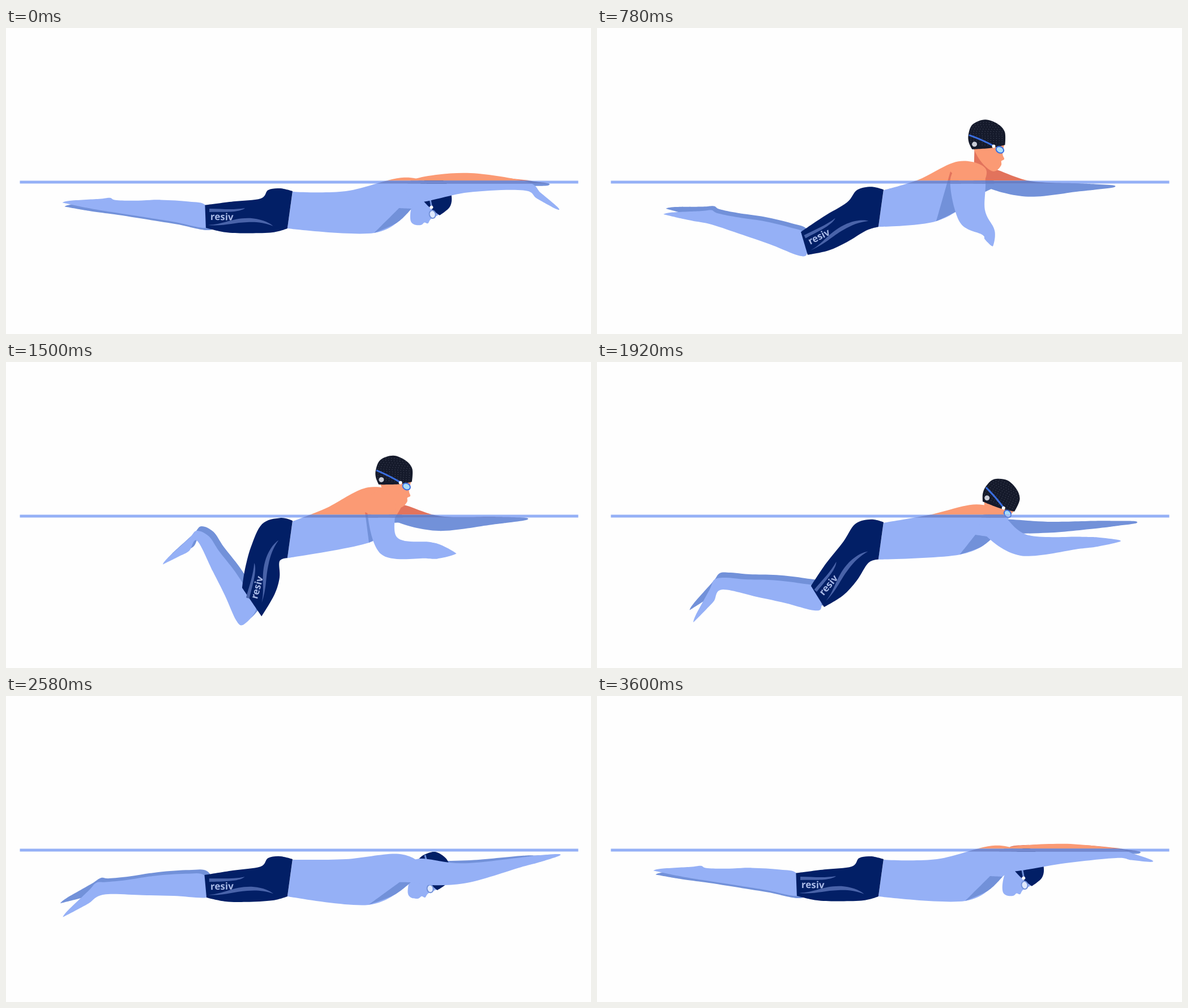
An HTML page for the animation above (3720 ms loop, 1033 by 542 pixels).

```html
<!DOCTYPE html>
<html lang="en">
<head>
<meta charset="utf-8">
<title>Swimmer</title>
<style>
html, body { margin: 0; width: 100%; height: 100%; overflow: hidden; background: #fefefe; }
svg { display: block; width: 100vw; height: 100vh; }
use { --suit: #021f66; }
.air { --skin: #fb9a74; --shade: #e2735c; --cap: #151a2b; --dot: #454a5c; --strap: #3a6ee0; --lens: #a9dcf8; --rim: #fff; --logo: #c9ccd6; }
.line { --skin: #7389d0; --shade: #687ec4; --cap: #2c4288; --dot: none; --strap: #5c7fd8; --lens: #a9c4f5; --rim: #c4d3fa; --logo: #a9bbec; }
.water { --skin: #95b0f6; --shade: #7291d9; --cap: #021f66; --dot: none; --strap: #7291d9; --lens: #dfe9fd; --rim: #fff; --logo: #b9c8f0; }
.skin { fill: var(--skin); }
.shade { fill: var(--shade); }
.cap { fill: var(--cap); }
.suit { fill: var(--suit); }
.dots { fill: none; stroke: var(--dot); stroke-width: 1.1; stroke-dasharray: 1.2 3.8; }
.strap { fill: none; stroke: var(--strap); stroke-width: 3; }
.lens { fill: var(--lens); stroke: var(--strap); stroke-width: 2; }
.rim { fill: var(--rim); }
.logo { fill: var(--logo); }
.trim { fill: #4963a9; }
text { font: bold 17px "Open Sans", sans-serif; fill: #a9b9e6; }
</style>
</head>
<body>
<svg viewBox="0 0 1033 542" preserveAspectRatio="none">
  <defs>
    <clipPath id="above"><rect width="1033" height="270.5"/></clipPath>
    <clipPath id="at"><rect x="24.5" y="270.5" width="986" height="5"/></clipPath>
    <clipPath id="below"><rect y="275" width="1033" height="267"/></clipPath>
    <g id="swimmer">
      <path id="farArm" class="shade"/>
      <path id="farLeg" class="shade"/>
      <path id="neck" class="shade"/>
      <g id="head">
        <path id="face" class="skin"/>
        <path id="cap" class="cap"/>
        <path id="dots" class="dots"/>
        <circle class="logo" cx="-22" cy="17" r="4.5"/>
        <path class="strap" d="M-32 1Q-8 9 13 20"/>
        <ellipse class="lens" cx="23" cy="26" rx="7" ry="5.5" transform="rotate(25 23 26)"/>
        <circle class="rim" cx="12" cy="20" r="3"/>
      </g>
      <path id="torso" class="skin"/>
      <path id="belly" class="shade"/>
      <path id="leg" class="skin"/>
      <path id="shorts" class="suit"/>
      <g id="print">
        <path class="trim" d="M-2-20C20-20 40-18 61-22C50-13 20-15-2-14Z"/>
        <path class="trim" d="M-4 9C25 8 40-6 75-4C95-2 105 4 111 9C95 3 80 2 65 3C40 4 25 11-4 9Z"/>
        <text>resiv</text>
      </g>
      <path id="arm" class="skin"/>
    </g>
  </defs>
  <use href="#swimmer" class="water" clip-path="url(#below)"/>
  <use href="#swimmer" class="air" clip-path="url(#above)"/>
  <rect x="24.5" y="270.5" width="986" height="5" fill="#94b0f6"/>
  <use href="#swimmer" class="line" clip-path="url(#at)"/>
</svg>
<script>
const LOOP = 3720, STEP = 60, LAST = 3600;
const HIP = [480, 322], FOOT = 86;

// torso: back, shoulder, throat, chest, belly, inner end of the belly shade
// arms: shoulder, elbow, fingertip, shoulder half width, hand half width, wrist curl
// legs: knee, calf angle, calf length, foot angle, far leg shift, far foot angle
// head: centre, angle
const glide = {
  torso: [600,289, 700,265, 745,280, 716,320, 650,363, 694,319],
  arm: [725,288, 815,274, 973,319, 21, 6, -22],
  farArm: [740,275, 850,272, 957,277, 10, 4, 0],
  legs: [350,334, 187,166, 183, 4,4, 181],
  head: [760,296, 53]
};
const poses = [
  [0, glide],
  [480, {
    torso: [580,272, 665,240, 718,252, 690,300, 605,348, 650,279],
    arm: [682,280, 730,350, 767,453, 28, 6, -18],
    farArm: [715,268, 790,275, 923,274, 15, 5, 0],
    legs: [353,350, 190,168, 198, 5,-2, 197],
    head: [704,205, 9]
  }],
  [1080, {
    torso: [560,267, 622,234, 667,250, 648,300, 598,336, 610,240],
    arm: [638,252, 622,315, 673,317, 31, 13, 0],
    farArm: [680,265, 750,292, 907,287, 18, 5, 0],
    legs: [379,420, 209,162, 162, 3,-10, 167],
    head: [685,187, 0]
  }],
  [1500, {
    torso: [565,259, 640,222, 700,238, 680,285, 641,320, 634,266],
    arm: [662,250, 676,325, 792,339, 25, 12, 0],
    farArm: [695,268, 765,286, 918,278, 16, 5, 0],
    legs: [424,448, 241,160, 144, 8,-8, 144],
    head: [686,193, 4]
  }],
  [1680, { head: [692,206, 8] }],
  [1920, { legs: [385,420, 190,168, 125, 8,-9, 138] }],
  [2160, { head: [744,271, 48] }],
  [2280, {
    torso: [600,284, 690,278, 728,300, 710,331, 640,364, 690,328],
    arm: [720,312, 800,321, 980,292, 23, 6, 0],
    farArm: [730,305, 820,298, 968,289, 9, 4, 0],
    legs: [352,338, 176,187, 134, 8,-8, 158],
    head: [756,292, 57]
  }],
  [2940, {
    torso: [600,291, 695,280, 741,302, 716,327, 640,371, 696,330],
    arm: [728,305, 810,303, 968,277, 21, 7, 0],
    farArm: [740,295, 830,293, 966,276, 8, 4, 0],
    legs: [350,337, 185,171, 155, 3,-4, 155],
    head: [759,311, 56]
  }],
  [LAST, { ...glide, arm: [725,290, 825,279, 978,292, 21, 6, -8], head: [762,301, 53] }]
];

// monotone cubic through the poses that hold one part
function sample(part, t) {
  const ks = poses.filter(k => part in k[1]).map(k => [k[0], k[1][part]]);
  let i = 0;
  while (i < ks.length - 2 && t >= ks[i + 1][0]) i++;
  const span = ks[i + 1][0] - ks[i][0], u = (t - ks[i][0]) / span;
  const rate = (a, c) => (ks[a + 1][1][c] - ks[a][1][c]) / (ks[a + 1][0] - ks[a][0]);
  const slope = (a, c) => {
    const p = rate(Math.max(a - 1, 0), c), q = rate(Math.min(a, ks.length - 2), c);
    if (p * q <= 0) return 0;
    return Math.sign(p) * Math.min(Math.abs(p + q) / 2, 3 * Math.abs(p), 3 * Math.abs(q));
  };
  return ks[i][1].map((v, c) => v + (ks[i + 1][1][c] - v) * u * u * (3 - 2 * u)
    + span * u * (1 - u) * (slope(i, c) * (1 - u) - slope(i + 1, c) * u));
}

const $ = id => document.getElementById(id);
const set = (id, d) => $(id).setAttribute("d", d);
const fix = v => v.toFixed(1);
const mix = (p, q, k) => [p[0] + (q[0] - p[0]) * k, p[1] + (q[1] - p[1]) * k];
const pairs = a => a.flatMap((v, i) => i % 2 ? [] : [[v, a[i + 1]]]);
const angle = (p, q) => Math.atan2(q[1] - p[1], q[0] - p[0]) * 180 / Math.PI;

// local frame at p: along the given angle, then to its side
function frameAt([x, y], deg) {
  const c = Math.cos(deg * Math.PI / 180), s = Math.sin(deg * Math.PI / 180);
  return (u, v) => [x + c * u - s * v, y + s * u + c * v];
}

// closed smooth outline; listed indices stay sharp
function outline(pts, sharp = []) {
  const n = pts.length, p = i => pts[(i + n) % n];
  const handle = (i, dir) => {
    const k = sharp.includes(i % n) ? 0 : dir / 6;
    return [0, 1].map(c => fix(p(i)[c] + (p(i + 1)[c] - p(i + n - 1)[c]) * k));
  };
  const curve = (q, i) => "C" + [handle(i, 1), handle(i + 1, -1), p(i + 1).map(fix)].join(" ");
  return "M" + pts[0].map(fix) + pts.map(curve).join("") + "Z";
}

function armPath([sx, sy, ex, ey, tx, ty, wide, hand, curl]) {
  const s = [sx, sy], e = [ex, ey], tip = [tx, ty];
  const wrist = frameAt(mix(e, tip, 0.6), angle(e, tip))(0, curl);
  const joints = [s, e, wrist, mix(wrist, tip, 0.45), tip];
  const half = [wide, wide * 0.82, hand * 1.1 + 1.5, hand, 2];
  const edge = side => joints.map((p, i) => {
    const a = frameAt([0, 0], angle(joints[Math.max(i - 1, 0)], joints[Math.max(i, 1)]))(1, 0);
    const b = frameAt([0, 0], angle(joints[Math.min(i, 3)], joints[Math.min(i + 1, 4)]))(1, 0);
    return frameAt(p, angle([0, 0], [a[0] + b[0], a[1] + b[1]]))(0, side * half[i]);
  });
  return outline([...edge(1), ...edge(-1).reverse(), frameAt(s, angle(s, e))(-wide * 0.85, 0)]);
}

function legPath(knee, calf, len, toe) {
  const shin = frameAt(knee, calf), foot = frameAt(shin(len, 0), toe);
  const on = (bone, size, list) => pairs(list).map(([u, v]) => bone(u * size, v));
  return outline([
    ...on(shin, len, [0,20, .18,23, .48,20, .76,13, .96,10]),
    ...on(foot, FOOT, [.03,13, .25,10, .85,4, 1,0, .65,-5, .4,-8]),
    ...on(shin, len, [.98,-12, .6,-14, .3,-16, 0,-20, -.08,-12])
  ], [8]);
}

// the shorts follow the thigh; the hem tilts and widens as the knee bends
function drawShorts(knee, calf) {
  const thigh = angle(HIP, knee), lift = 174 - thigh, bend = calf - thigh;
  const squash = (bend / 124) ** 2;
  const len = Math.hypot(knee[0] - HIP[0], knee[1] - HIP[1]) - 2 - 22 * squash;
  const bone = frameAt(HIP, thigh), centre = bone(len, 0);
  const hem = frameAt(centre, thigh + bend * 0.25), wide = 20 + 10 * squash;
  const rise = 0.13 * lift;
  set("shorts", outline([
    [506, 289 - rise], [484, 284 - rise], [463 - 0.18 * lift, 287],
    bone(len * 0.22, 23 + 0.3 * lift), bone(len * 0.6, 22 + 0.2 * lift),
    hem(0, wide), hem(0, -wide),
    bone(len * 0.75, -31), bone(len * 0.47, -36 + 0.15 * lift),
    [471 + 0.2 * lift, 362 - 0.15 * lift], [497, 355 - rise]
  ], [0, 5, 6, 10]));
  place("print", [...bone(len - 8, -7), -1.25 * lift]);
  return rise;
}

function drawTorso(rise, head, farShoulder) {
  const [back, shoulder, throat, chest, belly, inner] = pairs(sample("torso", T));
  const top = [506, 290 - rise], bottom = [497, 355 - rise];
  set("torso", outline([top, back, shoulder, throat, chest, belly, bottom], [0, 6]));
  const mid = [0, 1].map(c => (9 * (chest[c] + belly[c]) - throat[c] - bottom[c]) / 16);
  set("belly", outline([inner, chest, mid, belly], [0, 1, 3]));
  const skull = frameAt(head, head[2]);
  set("neck", outline([skull(-22, 24), skull(4, 50), [farShoulder[0] + 10, farShoulder[1] + 16], chest], [0, 1, 2, 3]));
}

const place = (id, [x, y, a]) =>
  $(id).setAttribute("transform", `translate(${fix(x)} ${fix(y)}) rotate(${fix(a)})`);

let T = 0;
function draw(t) {
  T = t;
  const head = sample("head", t), farArm = sample("farArm", t);
  const [x, y, calf, len, toe, dx, dy, farToe] = sample("legs", t);
  set("leg", legPath([x, y], calf, len, toe));
  set("farLeg", legPath([x + dx, y + dy], calf, len, farToe));
  drawTorso(drawShorts([x, y], calf), head, farArm);
  set("arm", armPath(sample("arm", t)));
  set("farArm", armPath(farArm));
  place("head", head);
}

set("cap", outline(pairs([-33,0, -26,-18, -4,-27, 18,-20, 31,-6, 32,17, 8,23, -26,26, -32,14]), [5, 7]));
set("face", outline(pairs([-24,24, 31,15, 28,33, 31,42, 26,46, 26,53, 19,62, 10,64, -2,56, -14,42]), [0, 1]));
let rows = "";
for (let y = -22; y < 20; y += 4) {
  const w = y < 0 ? 30 * Math.sqrt(1 - (y / 27) ** 2) : 29;
  rows += `M${fix(-w)} ${y}H${fix(w)}`;
}
set("dots", rows);

function tick() {
  const t = performance.now() % LOOP;
  draw(Math.min(LAST, Math.floor(t / STEP) * STEP));
  requestAnimationFrame(tick);
}
tick();
</script>
</body>
</html>
```
